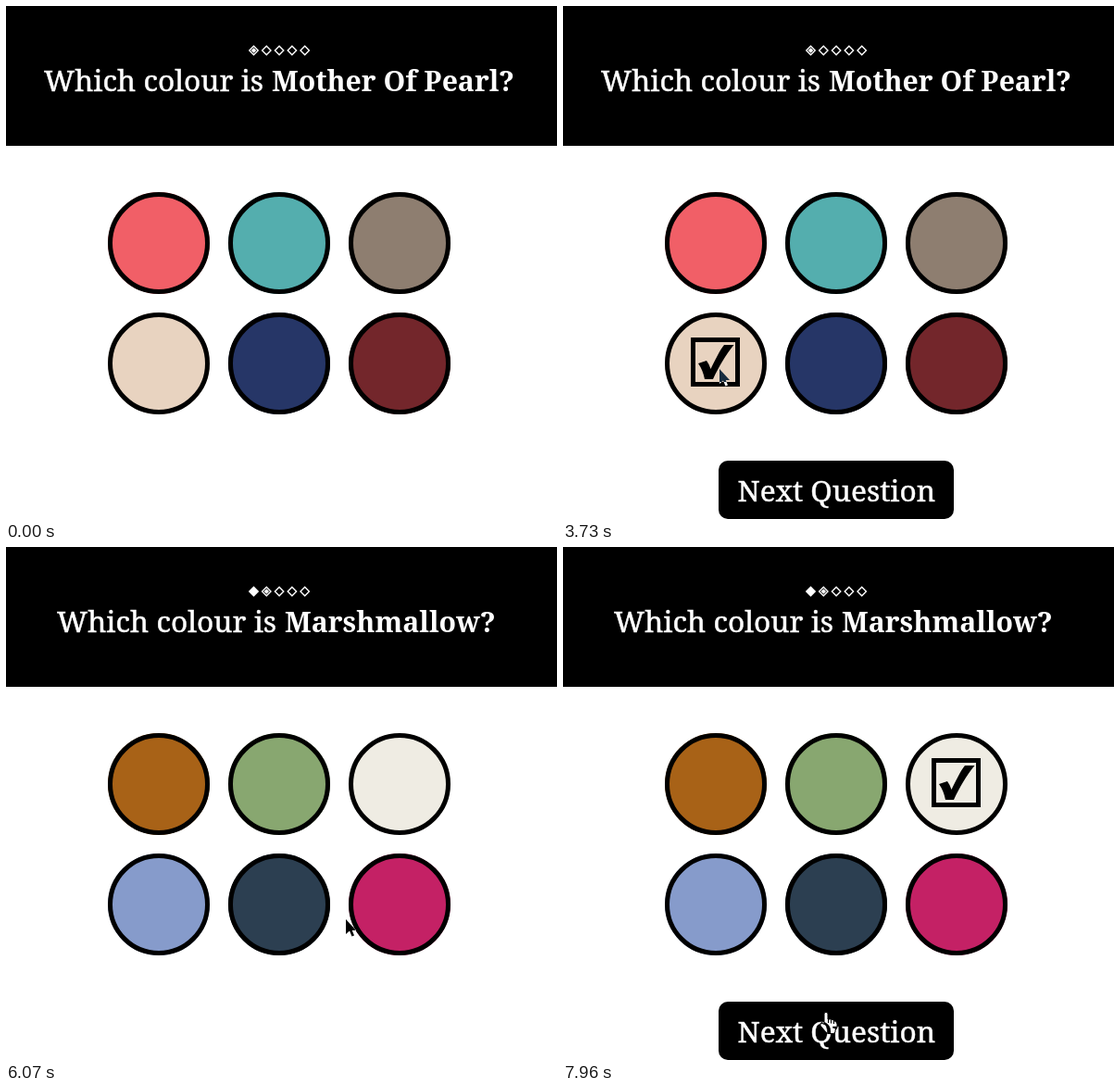
An HTML page with a canvas for the animation above (8 s loop, 595 px wide and 554 px high).

```html
<!DOCTYPE html>
<html lang="en">
<head>
<meta charset="utf-8">
<title>Colour quiz</title>
<style>
  html, body { margin: 0; width: 100%; height: 100%; overflow: hidden; background: #fff; }
  canvas { display: block; }
</style>
</head>
<body>
<canvas id="stage" width="595" height="554"></canvas>
<script>
const ctx = document.getElementById('stage').getContext('2d');
const LOOP = 8000;
const REGULAR = { font: '400 31.7px "Noto Serif", serif', outline: 0.5 };
const STRONG = { font: '600 30.2px "Noto Serif", serif', outline: 0 };
const BUTTON = { x: 168, y: 491, w: 254, h: 63 };

const questions = [
  { start: 0, answered: 3730, answer: 3, name: 'Mother Of Pearl?', x: 41,
    colours: ['#f15f67', '#54aeae', '#8e7e70', '#e8d3c0', '#263667', '#73262b'] },
  { start: 5130, answered: 7180, answer: 2, name: 'Marshmallow?', x: 55,
    colours: ['#a86217', '#88a770', '#efece3', '#869bcb', '#2c3f51', '#c42165'] }
];

// The pointer advances in discrete steps between these points.
const moves = [
  { start: 290, end: 590, steps: 5, from: [497, 547], to: [239, 478] },
  { start: 910, end: 1060, steps: 3, from: [239, 478], to: [235, 466] },
  { start: 1230, end: 1710, steps: 7, from: [235, 466], to: [169, 392] },
  { start: 4270, end: 4740, steps: 7, from: [169, 392], to: [316, 531] },
  { start: 5670, end: 6400, steps: 10, from: [316, 531], to: [418, 273] },
  { start: 6480, end: 6560, steps: 2, from: [418, 273], to: [430, 243] },
  { start: 7650, end: 7960, steps: 5, from: [430, 243], to: [284, 502] }
];

const arrow = new Path2D('M0 0V16L4 12.5L6.5 18.5L9 17.5L6.7 12H11Z');
const hand = new Path2D('M-2 1.5Q0 -1 2 1.5V8L5 8L8 9L11 11L12 13V17L10 20V22L8 23.5H2L0 22L-6 15V12.5L-4 11.5L-2 13.5Z');
const fingers = new Path2D('M2.5 8V12M5.5 9V12.5M8.5 10V13');
const tick = new Path2D('M-19 2L-10 -1Q-7 3 -5.5 8C-1 -1 4 -12 9 -18H19.5C11 -8 3 6 -3 19H-12Q-14 9 -19 2Z');

const ease = u => u * u * (3 - 2 * u);
const centre = i => [165 + i % 3 * 130, 256 + Math.floor(i / 3) * 130];

function pointerAt(t) {
  const move = moves.filter(m => t >= m.start).pop();
  if (!move) return null;
  const { start, end, steps, from, to } = move;
  const done = Math.floor((t - start) / (end - start) * (steps - 1) + 1e-6) + 1;
  const u = ease(Math.min(1, done / steps));
  return from.map((v, i) => Math.round(v + (to[i] - v) * u));
}

function text(string, x, y, { font, outline }) {
  ctx.font = font;
  ctx.fillStyle = ctx.strokeStyle = '#fff';
  ctx.fillText(string, x, y);
  if (outline) {
    ctx.lineWidth = outline;
    ctx.strokeText(string, x, y);
  }
}

function diamond(x, y, r) {
  ctx.beginPath();
  ctx.moveTo(x, y - r);
  ctx.lineTo(x + r, y);
  ctx.lineTo(x, y + r);
  ctx.lineTo(x - r, y);
  ctx.closePath();
}

function drawProgress(current) {
  ctx.strokeStyle = ctx.fillStyle = '#fff';
  ctx.lineWidth = 1.4;
  for (let i = 0; i < 5; i++) {
    const x = 267.5 + i * 13.8;
    diamond(x, 48, 4.7);
    ctx.stroke();
    if (i > current) continue;
    if (i === current) diamond(x, 48, 2.8);
    ctx.fill();
  }
}

function drawSwatch([x, y], colour, hovered) {
  ctx.fillStyle = colour;
  ctx.beginPath();
  ctx.arc(x, y, 55, 0, 7);
  ctx.fill();
  if (hovered) {
    ctx.fillStyle = '#000';
    for (let i = 0; i < 32; i++) {
      const a = (i + 0.5) * Math.PI / 16;
      ctx.beginPath();
      ctx.arc(x + 52.5 * Math.cos(a), y + 52.5 * Math.sin(a), 2.5, 0, 7);
      ctx.fill();
    }
  } else {
    ctx.strokeStyle = '#000';
    ctx.lineWidth = 5;
    ctx.beginPath();
    ctx.arc(x, y, 52.5, 0, 7);
    ctx.stroke();
  }
}

function drawCheck([x, y]) {
  ctx.save();
  ctx.translate(x, y - 2);
  ctx.strokeStyle = ctx.fillStyle = '#000';
  ctx.lineWidth = 5;
  ctx.strokeRect(-24.5, -23.5, 48, 48);
  ctx.fill(tick);
  ctx.restore();
}

// The pointer inverts whatever lies beneath it.
function drawPointer([x, y], pointing) {
  ctx.save();
  ctx.translate(x, y);
  ctx.globalCompositeOperation = 'difference';
  ctx.fillStyle = '#fff';
  ctx.fill(pointing ? hand : arrow);
  if (pointing) {
    ctx.globalCompositeOperation = 'source-over';
    ctx.strokeStyle = '#000';
    ctx.lineWidth = 1;
    ctx.stroke(hand);
    ctx.stroke(fingers);
  }
  ctx.restore();
}

function draw(t) {
  const current = t < questions[1].start ? 0 : 1;
  const question = questions[current];
  const answered = t >= question.answered;
  const pointer = pointerAt(t);

  ctx.fillStyle = '#fff';
  ctx.fillRect(0, 0, 595, 554);
  ctx.fillStyle = '#000';
  ctx.fillRect(0, 0, 595, 151);
  drawProgress(current);
  text('Which colour is', question.x, 92, REGULAR);
  text(question.name, question.x + 246, 92, STRONG);

  let pointing = false;
  question.colours.forEach((colour, i) => {
    const [x, y] = centre(i);
    const hovered = !answered && pointer !== null &&
      Math.hypot(pointer[0] - x, pointer[1] - y) < 55;
    pointing ||= hovered;
    drawSwatch([x, y], colour, hovered);
  });

  if (answered) {
    const { x, y, w, h } = BUTTON;
    drawCheck(centre(question.answer));
    ctx.fillStyle = '#000';
    ctx.beginPath();
    ctx.roundRect(x, y, w, h, 10);
    ctx.fill();
    text('Next Question', 188.5, 535, REGULAR);
    pointing = pointer[0] > x && pointer[0] < x + w && pointer[1] > y;
  }
  if (pointer) drawPointer(pointer, pointing);
}

const began = performance.now();
function frame() {
  draw((performance.now() - began) % LOOP);
  requestAnimationFrame(frame);
}
frame();
</script>
</body>
</html>
```
